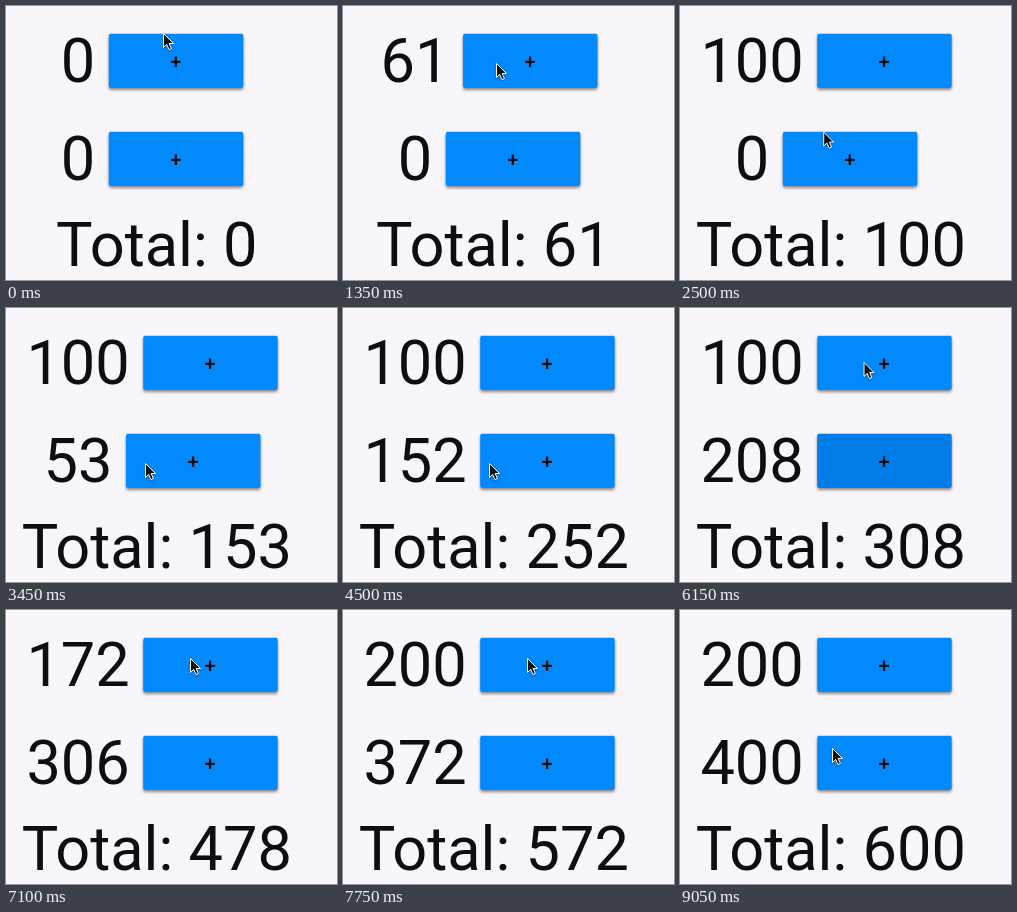
An HTML page that plays this animation: 331x274 px, repeating every 9.1 s.

```html
<!DOCTYPE html>
<html>
<head>
<meta charset="utf-8">
<style>
  html, body { margin: 0; width: 100%; height: 100%; overflow: hidden; background: #f8f6fa; }
  svg { display: block; }
  text { font: 61.3px Roboto, sans-serif; fill: #0e0e10; }
  .plus { font-size: 20px; font-weight: 500; text-anchor: middle; }
  #total { text-anchor: middle; }
  .face { fill: #0289fe; filter: drop-shadow(0 2px 1.5px rgba(0, 0, 0, .45)); }
  #cursor { filter: drop-shadow(0 1px 1px rgba(0, 0, 0, .3)); }
</style>
</head>
<body>
<svg width="331" height="274" viewBox="0 0 331 274">
  <defs>
    <rect id="plate" x="102.8" y="27.5" width="134.5" height="54.5" rx="2.5"/>
    <g id="button">
      <use href="#plate" class="face"/>
      <path d="M104 27.5H236" stroke="#84f3f2"/>
    </g>
    <g id="row">
      <text class="count" y="75.5"></text>
      <g class="press">
        <use href="#button"/>
        <use href="#plate" class="shade" opacity="0"/>
        <text class="plus" x="169.8" y="61.7">+</text>
      </g>
    </g>
  </defs>
  <g id="rows"></g>
  <text id="total" x="150.8" y="259.5"></text>
  <path id="cursor" d="M.5 .5V14.5L3.7 11.4L6 16.6L8.4 15.6L6.2 10.5H10.5Z" fill="#111" stroke="#fff"/>
</svg>
<script>
const LOOP = 9100, STEP = 50, DIGIT = 34.4;
const find = id => document.getElementById(id);
const clamp = (v, max = 1) => Math.max(0, Math.min(max, v));

// Each click counts up by 100; a double click queues two runs.
const counters = [
  t => run(t, 745, 100, 9.9) + run(t, 6385, 100, 9.9),
  t => run(t, 2890, 200, 10.55) + run(t, 6065, 200, 9.75)
];
const run = (t, start, steps, tick) => Math.floor(clamp((t - start) / tick, steps));

// The pointer starts at (157, 27) and glides to each stop in turn.
const glides = [
  { start: 0, time: 150, x: 153, y: 57 },
  { start: 2150, time: 500, x: 139, y: 155 },
  { start: 3450, time: 1000, x: 146, y: 155 },
  { start: 5950, time: 200, x: 183.5, y: 54 },
  { start: 6150, time: 200, x: 184, y: 48 },
  { start: 8950, time: 100, x: 152, y: 138 }
];

function pointer(t) {
  let x = 157, y = 27;
  for (const g of glides) {
    const k = clamp((t - g.start) / g.time);
    x += (g.x - x) * k;
    y += (g.y - y) * k;
  }
  return [x, y];
}

const rows = counters.map((count, i) => {
  const node = find('row').cloneNode(true);
  node.removeAttribute('id');
  node.setAttribute('transform', `translate(0 ${i * 98})`);
  find('rows').append(node);
  const part = name => node.querySelector('.' + name);
  return { count, label: part('count'), button: part('press'), shade: part('shade') };
});

function draw(now) {
  const t = Math.floor(now % LOOP / STEP) * STEP;
  let sum = 0;
  for (const { count, label, button } of rows) {
    const n = count(t);
    const shift = (String(n).length - 1) * DIGIT / 2;
    sum += n;
    label.textContent = n;
    label.setAttribute('x', 54.8 - shift);
    button.setAttribute('transform', `translate(${shift} 0)`);
  }
  rows[1].shade.setAttribute('opacity', .09 * clamp(2.5 - Math.abs(t - 6150) / 100));
  find('total').textContent = 'Total: ' + sum;
  find('cursor').setAttribute('transform', `translate(${pointer(t)})`);
  requestAnimationFrame(draw);
}
requestAnimationFrame(draw);
</script>
</body>
</html>
```
